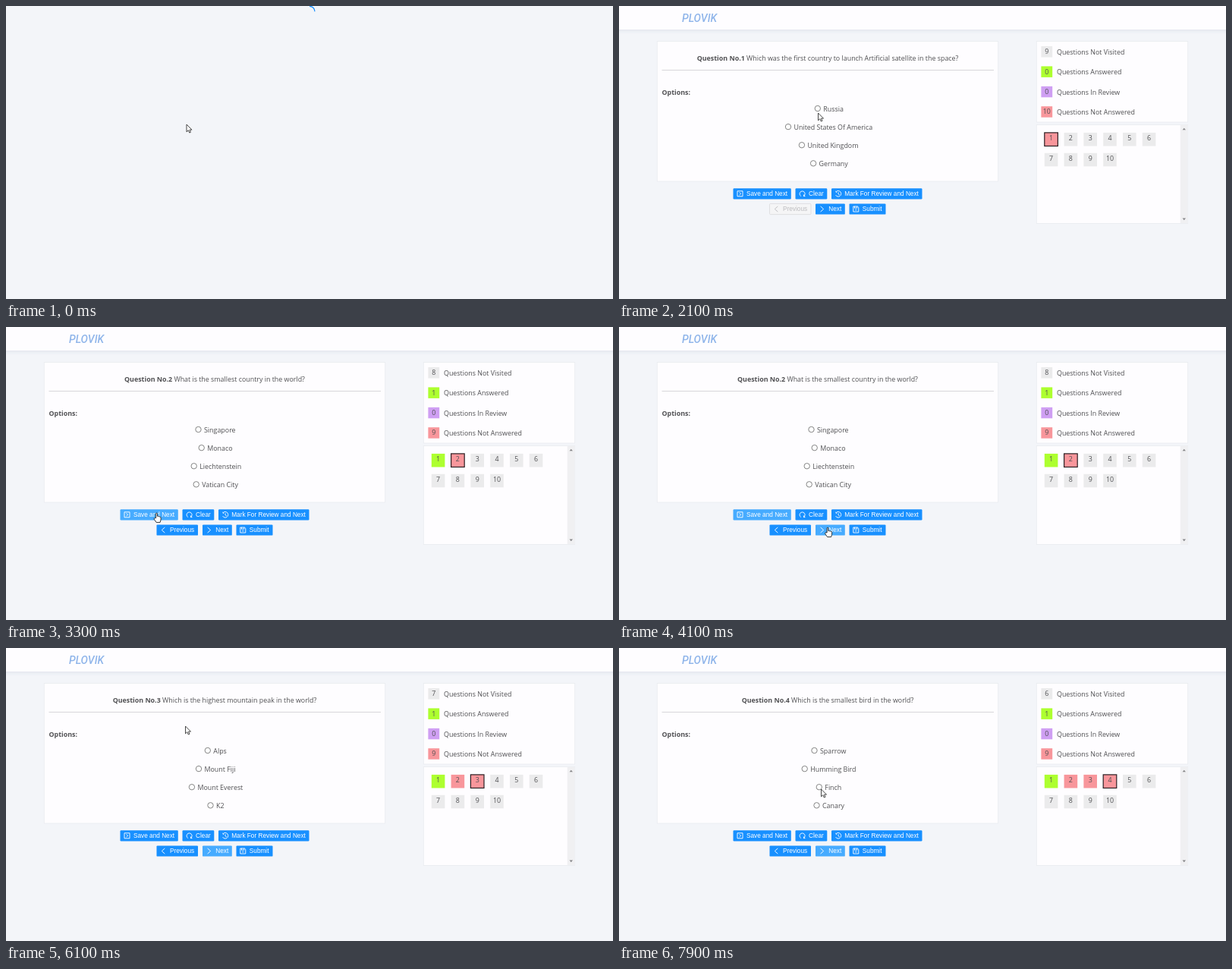
Recreate the animation shown at these times as an HTML page. Size 800 by 386 pixels, loop 8000 ms.

```html
<!DOCTYPE html>
<html lang="en">
<head>
<meta charset="utf-8">
<title>Quiz</title>
<style>
  html, body { margin: 0; width: 100%; height: 100%; overflow: hidden; background: #f3f5f9; }
  svg { display: block; width: 100%; height: 100%; }
  text { font: 8.9px "Open Sans", "Noto Sans", sans-serif; fill: #505053; white-space: pre; }
  .bold { font-weight: 700; }
  .mid { text-anchor: middle; }
  .brand { font: italic 500 14px Roboto, sans-serif; fill: #8fb5ea; }
  .button text { font: 8.25px "Liberation Sans", Arial, sans-serif; fill: inherit; }
  .icon { fill: none; stroke-width: .9; }
</style>
</head>
<body>
<svg viewBox="0 0 800 386">
  <defs>
    <filter id="soft" x="-5%" y="-50%" width="110%" height="200%">
      <feDropShadow dx="0" dy="1" stdDeviation="2.5" flood-color="#506080" flood-opacity=".14"/>
    </filter>
  </defs>
  <g id="page"></g>
  <path id="arrow" d="M0 0V9.8L2.3 7.7L3.8 11L5.4 10.3L4 7.1H7Z" fill="#fff" stroke="#333" stroke-width=".9"/>
  <path id="hand" d="M-.9 6.8V.9Q-.9 0 0 0T.9 .9V4.3Q2.2 3.7 2.6 4.7Q3.8 4.2 4.2 5.2Q5.6 4.9 5.6 6.4V9L4.6 12.4H-.4L-3.3 8.2Q-3.5 6.6-2.2 6.5Z" fill="#fff" stroke="#222" stroke-width=".9"/>
</svg>
<script>
const LOOP = 8000, STEP = 100, LOADED = 400;
const page = document.getElementById('page');
const arrow = document.getElementById('arrow');
const hand = document.getElementById('hand');

const GREY = '#ebebec', GREEN = '#adff2f', PURPLE = '#cf9ff3', RED = '#f8969b';
const BLUE = '#1890ff', LIGHT = '#46abff';

const questions = [
  { from: 0, text: 'Which was the first country to launch Artificial satellite in the space?',
    options: [['Russia', 269.3], ['United States Of America', 230.5], ['United Kingdom', 248.4], ['Germany', 263.6]] },
  { from: 2900, text: 'What is the smallest country in the world?',
    options: [['Singapore', 261], ['Monaco', 265.2], ['Liechtenstein', 255.2], ['Vatican City', 258.2]] },
  { from: 4200, text: 'Which is the highest mountain peak in the world?',
    options: [['Alps', 273.3], ['Mount Fiji', 261.5], ['Mount Everest', 252.4], ['K2', 277]] },
  { from: 7500, text: 'Which is the smallest bird in the world?',
    options: [['Sparrow', 265], ['Humming Bird', 252.2], ['Finch', 271.3], ['Canary', 268]] }
];

// Icons are drawn around their own centre.
const buttons = [
  { id: 'save', label: 'Save and Next', x: 150.5, y: 240.2, w: 76.3, icon: 9, text: 17.5, d: 'M-3.5-3.5H3.5V3.5H-3.5ZM-1-1.8L1.2 0L-1 1.8' },
  { id: 'clear', label: 'Clear', x: 232.5, y: 240.2, w: 41.8, icon: 9, text: 17.5, d: 'M-1.7 3.2A3.5 3.5 0 1 1 2 3.1M2 1.2V3.3H3.9' },
  { id: 'mark', label: 'Mark For Review and Next', x: 280, y: 240.2, w: 119.5, icon: 9, text: 17.2, d: 'M-2.7-2.8A3.8 3.8 0 1 1-3.4 1.8M-3.8-3.2L-2.4-2.8L-2.7-1.2M0-2V.4L1.8 1.5' },
  { id: 'previous', label: 'Previous', x: 198.5, y: 260.4, w: 54.5, icon: 8.8, text: 17.5, d: 'M2-3.6L-2 0L2 3.6' },
  { id: 'next', label: 'Next', x: 259, y: 260.4, w: 38.8, icon: 8.6, text: 17.3, d: 'M-2-3.6L2 0L-2 3.6' },
  { id: 'submit', label: 'Submit', x: 303.5, y: 260.4, w: 48, icon: 8.8, text: 17.3, d: 'M-3.5-3.5H2.2L3.5-2.2V3.5H-3.5ZM-1.8-3.5V-1.3H1.5V-3.5M-1.2 1.2H1.2' }
];

// Cursor stops: time, x, y
const stops = [
  [0, 238, 156], [400, 237, 157], [1000, 219, 170], [1400, 192, 246], [1600, 290, 195],
  [1800, 270, 153], [2100, 262.5, 141], [2300, 261, 133], [2450, 261, 133], [2700, 198.5, 245],
  [3600, 198.5, 245], [4000, 275, 264], [4500, 275, 266], [4700, 260.5, 143], [5000, 245, 67],
  [5300, 270, 175], [5500, 270, 175], [6000, 236.5, 103], [6150, 236.5, 103], [6400, 323, 68],
  [6800, 240, 160], [7200, 272, 263], [7500, 272, 263], [7900, 266.5, 186], [8000, 266.5, 186]
];

function cursorAt(t) {
  const i = stops.findIndex(s => s[0] > t);
  const [t0, x0, y0] = stops[i - 1], [t1, x1, y1] = stops[i];
  const k = (t - t0) / (t1 - t0), e = k * k * (3 - 2 * k);
  return { x: x0 + (x1 - x0) * e, y: y0 + (y1 - y0) * e };
}

const rect = (x, y, w, h, fill, more = '') =>
  `<rect x="${x}" y="${y}" width="${w}" height="${h}" fill="${fill}" ${more}/>`;
const label = (x, y, str, cls = '') => `<text x="${x}" y="${y}" class="${cls}">${str}</text>`;
const panel = (x, y, w, h) => rect(x, y, w, h, '#fefdff', 'stroke="#e9ebef" stroke-width=".8"');

function drawButton(b, disabled, lit) {
  const ink = disabled ? '#bcbcbf' : '#fff';
  const fill = disabled ? '#f5f5f6' : lit ? LIGHT : BLUE;
  const edge = disabled ? 'stroke="#d6d6d9" stroke-width=".7"' : '';
  return `<g class="button" fill="${ink}">` + rect(b.x, b.y, b.w, 14.2, fill, `rx="1.2" ${edge}`) +
    `<path class="icon" stroke="${ink}" transform="translate(${b.x + b.icon} ${b.y + 7.1})" d="${b.d}"/>` +
    label(b.x + b.text, b.y + 10, b.label) + '</g>';
}

function drawOption([str, x], i, chosen) {
  const y = 135 + 24.1 * i;
  return `<circle cx="${x - 7.5}" cy="${y}" r="3.7" fill="#fff" stroke="${chosen ? '#0075ff' : '#707070'}" stroke-width=".85"/>` +
    (chosen ? `<circle cx="${x - 7.5}" cy="${y}" r="2.2" fill="#0075ff"/>` : '') +
    label(x, y + 3.5, str);
}

function drawLegend(n) {
  const answered = n ? 1 : 0;
  return [
    [9 - n, GREY, 'Not Visited'], [answered, GREEN, 'Answered'],
    [0, PURPLE, 'In Review'], [10 - answered, RED, 'Not Answered']
  ].map(([count, fill, name], i) => {
    const y = 53 + 26.4 * i;
    return rect(556.4, y, 14.8, 14.5, fill) + label(563.8, y + 10.2, count, 'mid') +
      label(577, y + 10.9, 'Questions ' + name);
  }).join('');
}

function drawCells(n) {
  let out = '';
  for (let i = 0; i < 10; i++) {
    const x = 560.8 + 25.8 * (i % 6), y = 166.9 + 26.8 * Math.floor(i / 6);
    const fill = i > n ? GREY : i === 0 && n ? GREEN : RED;
    const edge = i === n ? 'stroke="#2b2023" stroke-width="1.2"' : '';
    out += rect(x, y, 17.6, 17.6, fill, edge) + label(x + 8.8, y + 10.4, i + 1, 'mid');
  }
  return out;
}

function drawPage(n, chosen, lit) {
  const q = questions[n];
  return rect(-10, -10, 820, 41, '#fefdff', 'filter="url(#soft)"') +
    label(83, 21, 'PLOVIK', 'brand') +
    panel(50.3, 46.5, 449.4, 184.5) +
    `<text x="275" y="72.4" class="mid"><tspan class="bold">Question No.${n + 1}</tspan> ${q.text}</text>` +
    rect(56.5, 84, 437.5, .9, '#d3d3d6') +
    label(56.5, 116.9, 'Options:', 'bold') +
    q.options.map((o, i) => drawOption(o, i, i === chosen)).join('') +
    buttons.map(b => drawButton(b, b.id === 'previous' && n === 0, lit.includes(b.id))).join('') +
    panel(550.3, 46.5, 199.4, 106.5) + drawLegend(n) +
    panel(550.3, 156.4, 199.4, 130) +
    rect(739.8, 156.8, 9.9, 129.3, '#f0f0f2') +
    '<path d="M742.6 163.3L744.8 160.7L747 163.3ZM742.6 279.6L744.8 282.2L747 279.6Z" fill="#858588"/>' +
    drawCells(n);
}

function drawSpinner(t) {
  return `<path d="M400 .3A6.9 6.9 0 0 1 406.9 7.2" transform="rotate(${t * .36} 400 7.2)" fill="none" stroke="${BLUE}" stroke-width="1.3"/>`;
}

let shown = '';
function render(time) {
  const t = Math.floor((time % LOOP) / STEP) * STEP;
  const c = cursorAt(t);
  const loaded = t >= LOADED;
  const n = questions.filter(q => q.from <= t).length - 1;
  const chosen = t >= 2400 && t < 2900 ? 0 : -1;
  const hover = loaded && buttons.find(b => c.x >= b.x && c.x <= b.x + b.w &&
    c.y >= b.y && c.y <= b.y + 14.2 && !(b.id === 'previous' && n === 0));
  const focus = t < 2900 ? '' : t < 4200 ? 'save' : 'next';

  const markup = loaded ? drawPage(n, chosen, [focus, hover ? hover.id : '']) : drawSpinner(t);
  if (markup !== shown) page.innerHTML = shown = markup;

  for (const [shape, on] of [[arrow, !hover], [hand, !!hover]]) {
    shape.setAttribute('transform', `translate(${c.x} ${c.y})`);
    shape.setAttribute('visibility', on ? 'visible' : 'hidden');
  }
}

const start = performance.now();
function tick() {
  render(performance.now() - start);
  requestAnimationFrame(tick);
}
tick();
</script>
</body>
</html>
```
